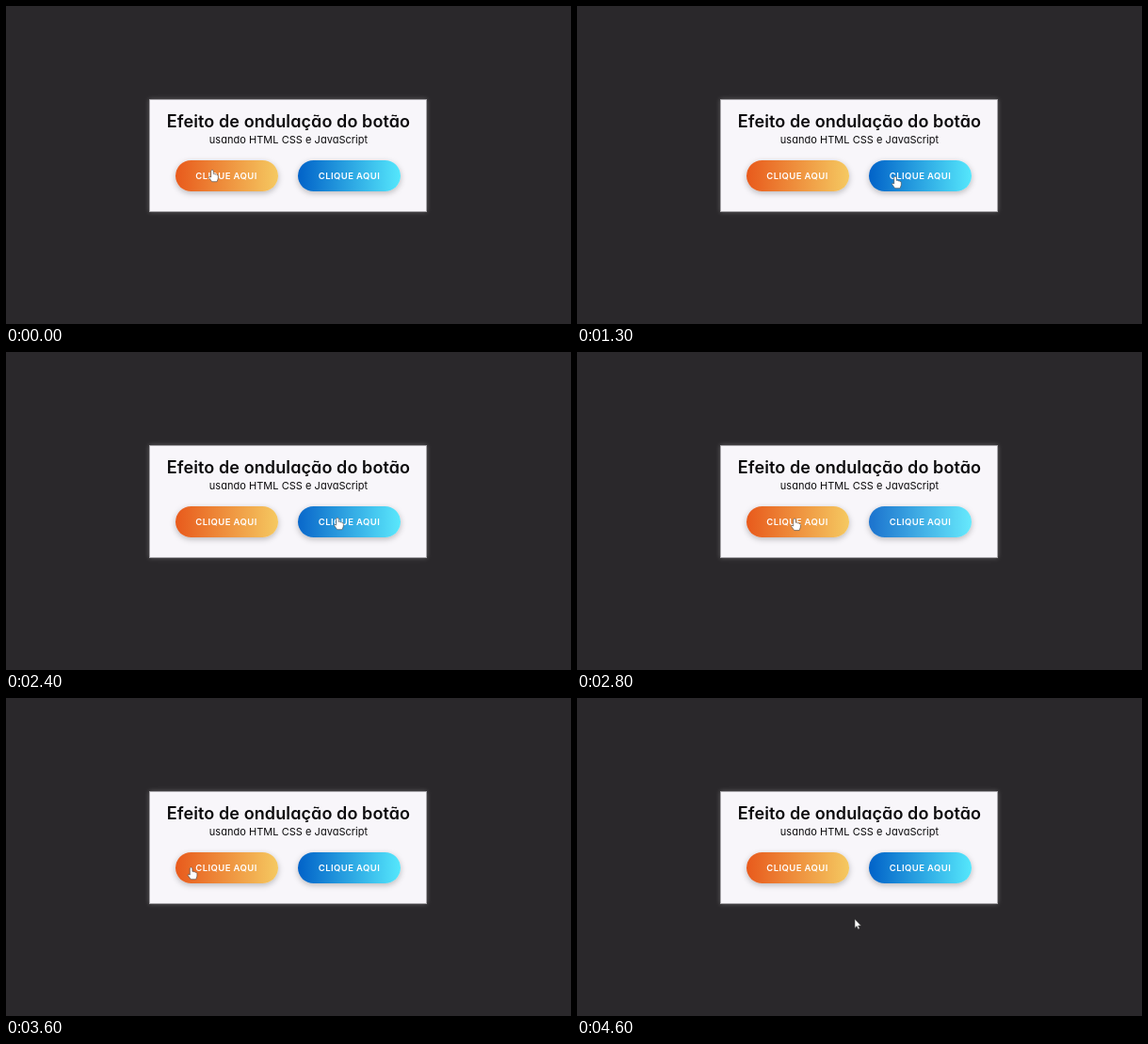
Recreate the animation shown at these times as an HTML page. Size 600 by 338 pixels, loop 4.7 s.

```html
<!DOCTYPE html>
<html lang="pt">
<head>
<meta charset="utf-8">
<title>Efeito de ondulação do botão</title>
<style>
html, body {
  margin: 0;
  width: 100%;
  height: 100%;
  overflow: hidden;
  background: #2a282b;
}
.stage {
  position: relative;
  width: 600px;
  height: 338px;
  overflow: hidden;
  font-family: Inter, "Open Sans", sans-serif;
  font-feature-settings: "cv11";
}
.panel {
  position: absolute;
  left: 152px;
  top: 99px;
  width: 293px;
  height: 118px;
  border: 1px solid #a9a7ab;
  background: #f8f6fa;
  box-shadow: 0 0 5px rgba(255, 255, 255, .25);
}
h1, p {
  position: absolute;
  left: 0;
  width: 600px;
  margin: 0;
  text-align: center;
  white-space: nowrap;
  color: #0b0a0c;
}
h1 {
  top: 111px;
  font-size: 18px;
  font-weight: 600;
  line-height: 24px;
  letter-spacing: .1px;
}
p {
  top: 132px;
  font-size: 11px;
  line-height: 20px;
  letter-spacing: .03px;
}
.button {
  position: absolute;
  top: 164px;
  width: 109px;
  height: 33px;
  border-radius: 17px;
  overflow: hidden;
  box-shadow: 0 2px 6px rgba(0, 0, 0, .25);
  color: #fff;
  font-size: 9.5px;
  font-weight: 600;
  line-height: 33px;
  letter-spacing: .4px;
  text-align: center;
  white-space: nowrap;
}
.orange { left: 179.5px; background: linear-gradient(90deg, #e85a1c, #f5c961); }
.blue { left: 310px; background: linear-gradient(90deg, #0162c8, #55e7fc); }
.ripple {
  position: absolute;
  border-radius: 50%;
  background: #fff;
  transform: translate(-50%, -50%);
}
svg {
  position: absolute;
  left: 0;
  top: 0;
}
#cursor path {
  fill: #fff;
  stroke: #444;
  stroke-width: .6;
  stroke-linejoin: round;
}
</style>
</head>
<body>
<div class="stage">
  <div class="panel"></div>
  <h1>Efeito de ondulação do botão</h1>
  <p>usando HTML CSS e JavaScript</p>
  <div class="button orange">CLIQUE AQUI</div>
  <div class="button blue">CLIQUE AQUI</div>
  <svg width="600" height="338">
    <g id="cursor">
      <path id="hand" d="M-1.3 1Q0 -1 1.3 1V4.4Q2.7 3.9 3.2 4.9Q4.5 4.5 4.9 5.5Q6.2 5.3 6.3 6.6V9.2L5.1 12.7H-.3L-3.4 8.6Q-4 6.5 -1.3 8Z"/>
      <path id="arrow" d="M0 0V9.4L2.1 7.5L3.6 10.8L5.1 10.1L3.6 7H6.6Z"/>
    </g>
  </svg>
</div>
<script>
const LOOP = 4700, STEP = 100;
const LIFE = 650, SIZE = 500, PEAK = .35;

// Where the cursor turns: time, x, y
const stops = [
  [0, 219, 174], [300, 290, 121], [600, 412, 183], [1300, 338, 181],
  [1700, 412, 184], [2100, 288, 176], [2400, 352, 176], [2900, 217, 177],
  [3100, 260, 170], [3500, 196, 180], [4100, 204, 180], [4400, 362, 206],
  [4600, 295, 235]
];
const clickTimes = [0, 550, 1300, 1950, 2500, 3600];

const $ = s => document.querySelector(s);
const orange = $(".orange"), blue = $(".blue");
const cursor = $("#cursor"), hand = $("#hand"), arrow = $("#arrow");

const ease = k => k * k * (3 - 2 * k);
const mix = (a, b, k) => a + (b - a) * k;

function tipAt(t) {
  const i = stops.findIndex(s => s[0] > t);
  if (i < 0) return stops[stops.length - 1].slice(1);
  const [t0, x0, y0] = stops[i - 1], [t1, x1, y1] = stops[i];
  const k = ease((t - t0) / (t1 - t0));
  return [mix(x0, x1, k), mix(y0, y1, k)];
}

function overButton(x, y) {
  return [orange, blue].some(b => {
    const dx = Math.max(Math.abs(x - b.offsetLeft - 54.5) - 38, 0);
    return Math.hypot(dx, y - 180.5) < 17;
  });
}

const ripples = clickTimes.map(start => {
  const [x, y] = tipAt(start);
  const button = x < 300 ? orange : blue;
  const el = document.createElement("span");
  el.className = "ripple";
  el.style.left = x - button.offsetLeft + "px";
  el.style.top = y - button.offsetTop + "px";
  button.append(el);
  return { start, el };
});

function draw(now) {
  const t = Math.floor(now % LOOP / STEP) * STEP;
  const [x, y] = tipAt(t);
  const over = overButton(x, y);
  cursor.setAttribute("transform", `translate(${x} ${y})`);
  hand.style.display = over ? "" : "none";
  arrow.style.display = over ? "none" : "";

  for (const { start, el } of ripples) {
    const k = (t - start) / LIFE;
    const live = k > 0 && k < 1;
    el.style.width = el.style.height = (live ? SIZE * k : 0) + "px";
    el.style.opacity = live ? PEAK * (1 - k) ** 2 : 0;
  }
}

const begin = performance.now();
function tick() {
  draw(performance.now() - begin);
  requestAnimationFrame(tick);
}
tick();
</script>
</body>
</html>
```
